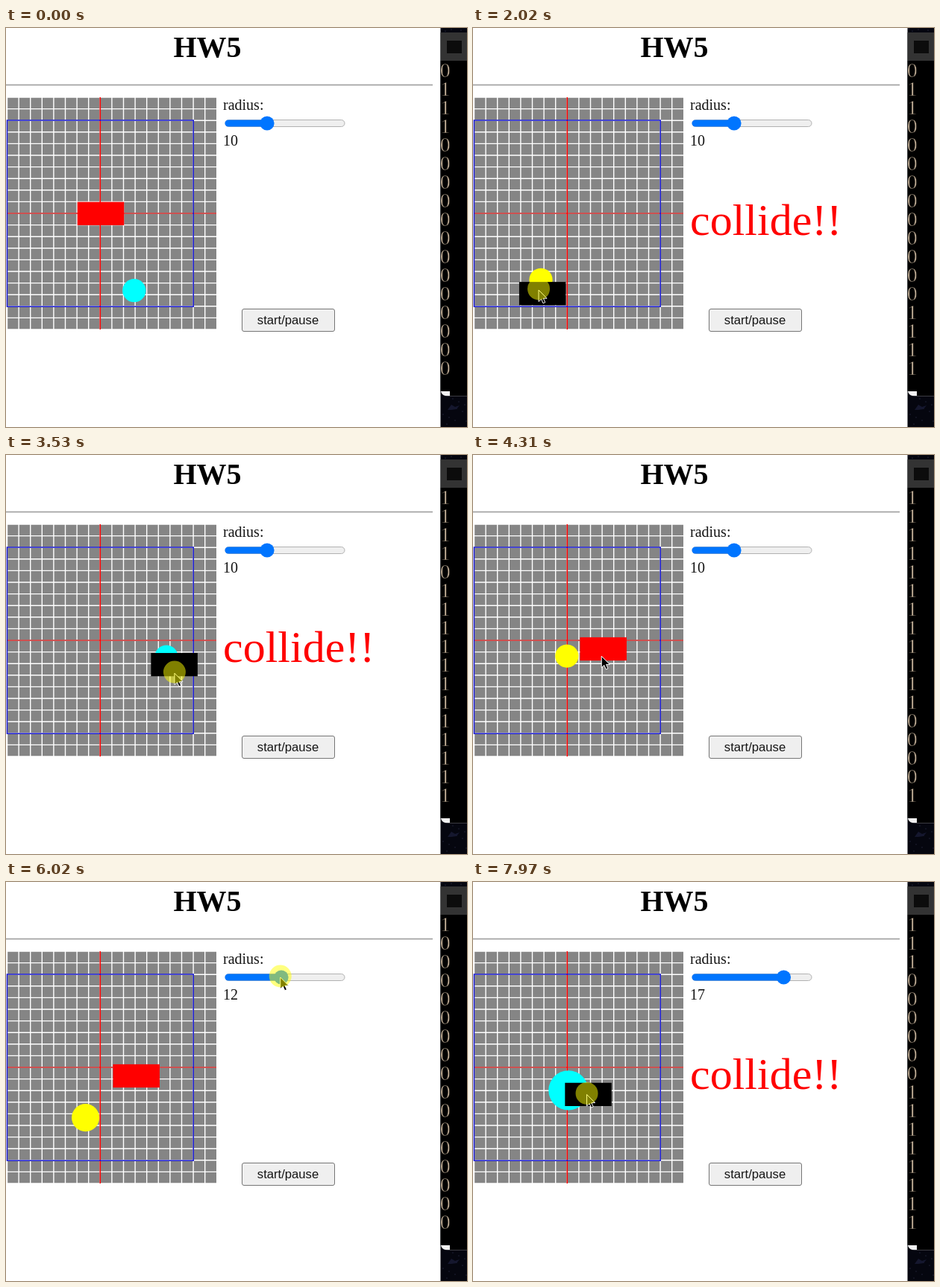
An HTML page that plays this animation: 618 by 536 pixels, repeating every 8000 ms.

```html
<!DOCTYPE html>
<html lang="en">
<head>
<meta charset="utf-8">
<title>HW5</title>
<style>
  html, body { margin: 0; width: 100%; height: 100%; overflow: hidden; background: #fff; }
  svg { display: block; width: 100%; height: 100%; }
  .serif { font-family: "Liberation Serif", "Times New Roman", serif; font-size: 20px; }
  .log { font-size: 28px; fill: #c4b199; stroke: #000; stroke-width: .6px; }
</style>
</head>
<body>
<svg viewBox="0 0 618 536">
  <rect width="618" height="536" fill="#fff"/>
  <text class="serif" x="270" y="39" text-anchor="middle" style="font-size:40px;font-weight:bold">HW5</text>
  <path d="M0 76.5H572" stroke="#999" stroke-width="1.5"/>

  <rect x="1" y="93" width="281" height="312" fill="#858585"/>
  <path id="grid" stroke="#fff" stroke-width="1.4" fill="none"/>
  <path d="M1 249H282" stroke="#c82020" stroke-width="1.4"/>
  <path d="M126.3 93V405" stroke="#f00" stroke-width="1.5"/>
  <rect x="1.5" y="124" width="249.7" height="250.2" fill="none" stroke="#1212cc" stroke-width="1.5"/>
  <circle id="ball"/>
  <rect id="block" width="62.5" height="31.25"/>

  <text class="serif" x="291" y="110" fill="#151515">radius:</text>
  <rect x="294" y="123.5" width="160" height="9" rx="4.5" fill="#efefef" stroke="#b2b2b2"/>
  <rect id="fill" x="293.5" y="123.4" height="9.2" rx="4.6" fill="#0075ff"/>
  <circle id="thumb" cy="128" r="9.6" fill="#0075ff"/>
  <text id="value" class="serif" x="291" y="158" fill="#151515"></text>
  <text id="alert" class="serif" x="291" y="278" style="font-size:60px;fill:#f00">collide!!</text>
  <rect x="316.5" y="377.5" width="124" height="30" rx="2.5" fill="#efefef" stroke="#767676"/>
  <text x="378" y="398" text-anchor="middle" fill="#151515" style="font:16.67px 'Liberation Sans',Arial,sans-serif">start/pause</text>

  <rect x="582.5" width="36" height="536" fill="#05060f"/>
  <g id="stars" fill="#3c4160"></g>
  <path d="M582.5 6H618V44H582.5Z" fill="#333"/>
  <path d="M582.5 44H618V494H591Q583 494 582.5 487Z" fill="#000"/>
  <path d="M583 487Q584 494 592 494.5H618" fill="none" stroke="#3c3c42"/>
  <rect x="591" y="17" width="20" height="17" fill="#0c0c0c"/>
  <path d="M583 488H595V494H589Q584 493 583 488Z" fill="#f2f2f2"/>
  <path d="M592 513l5-7 5 3 6-2-4 5-7 1z" fill="#15172e"/>
  <g id="log"></g>

  <path id="arrow" d="M0 0V15.5L3.6 12.2L6 17.8L8.7 16.6L6.3 11.2H11Z" fill="#000" stroke="#fff"/>
  <circle id="press" r="15" fill="#ff0" fill-opacity=".5"/>
</svg>
<script>
const LOOP = 8000, ROWS = 17, LINE_MS = 104, UNIT = 1.5625;
const BOX = { x: 1, y: 124, size: 250 }, BLOCK = { w: 62.5, h: 31.25 };

const $ = id => document.getElementById(id);
const set = (el, attrs) => { for (const k in attrs) el.setAttribute(k, attrs[k]); };
const show = (el, on) => el.setAttribute('visibility', on ? 'visible' : 'hidden');
const clamp = v => Math.min(1, Math.max(0, v));
const mix = (a, b, p) => a + (b - a) * p;
const ramp = (t, from, to) => clamp((t - from) / (to - from));
const ease = (t, from, to) => { const p = ramp(t, from, to); return p * p * (3 - 2 * p); };
const fold = v => 1 - Math.abs(v % 2 - 1);

function add(parent, tag, attrs) {
  const el = document.createElementNS('http://www.w3.org/2000/svg', tag);
  set(el, attrs);
  return parent.appendChild(el);
}

// Keys are [seconds, x, y], joined by straight lines.
function track(keys, t) {
  let i = 0;
  while (i < keys.length - 2 && t >= keys[i + 1][0]) i++;
  const [t0, x0, y0] = keys[i], [t1, x1, y1] = keys[i + 1];
  const p = ramp(t, t0, t1);
  return [mix(x0, x1, p), mix(y0, y1, p)];
}

// Distance travelled by the ball, counted in wall-to-wall crossings.
const travel = [[0, 1.29, 1.025], [1.41, 2.034, 2.482], [2.56, 2.61, 3.63], [3.53, 3.093, 4.6],
  [5.15, 3.939, 6.267], [6.85, 4.856, 8.053], [7.97, 5.49, 9.342], [8, 5.507, 9.377]];
// Where the dragged block is held relative to the ball.
const lead = [[1.66, 12, -25], [2.1, 0, 28], [2.19, 0, 48], [2.29, 8, 18],
  [2.56, 23, -2], [3.53, 10.7, 10.5], [7.97, 26.7, 5.5]];
// Mouse relative to the block while dragging, and on its own.
const grip = [[1.5, -13, -6], [2.56, 3, -3.5], [3.53, .3, 11.5], [7.97, -2, 0]];
const roam = [[.75, 490, 545], [1.1, 355, 470], [1.38, 114, 243], [4.4, 174, 271],
  [4.85, 283, 172], [5.15, 341, 138], [5.9, 350, 128], [6.35, 416, 128], [6.8, 170, 255]];

const slide = t => 10 + 7 * ramp(t, 5.9, 6.35);

function pose(t) {
  const r = slide(t) * UNIT, span = BOX.size - 2 * r;
  const [tx, ty] = track(travel, t);
  const x = BOX.x + r + span * fold(tx), y = BOX.y + r + span * fold(ty);

  const pull = ease(t, 1.5, 1.66) - ease(t, 3.72, 3.92) + ease(t, 7.03, 7.25);
  const home = t < 2.5 ? [127, 249.3] : [174.7, 260.5];
  const [lx, ly] = track(lead, t);
  const bx = mix(home[0], x + lx, pull), by = mix(home[1], y + ly, pull);

  const dx = Math.max(0, Math.abs(x - bx) - BLOCK.w / 2);
  const dy = Math.max(0, Math.abs(y - by) - BLOCK.h / 2);
  return { r, x, y, bx, by, hit: Math.hypot(dx, dy) < r };
}

// Each printed line tells whether the ball touched the block at that moment.
const lineTime = n => (n + .05) * LINE_MS;
const log = [...'0111'.padEnd(ROWS, '0')];
for (let n = 1; lineTime(n) < LOOP; n++) log.push(pose(lineTime(n) / 1000).hit ? '1' : '0');

let d = '';
for (let k = 0; k < 18; k++) d += `M${1.5 + k * 15.6} 93V405`;
for (let k = 0; k <= 20; k++) d += `M1 ${93 + k * 15.6}H282`;
set($('grid'), { d });

for (let i = 0; i < 14; i++) {
  add($('stars'), 'circle', { cx: 584 + i * 13 % 34, cy: i < 4 ? 1 + i : 497 + i * 17 % 38, r: .6 });
}

const rows = Array.from({ length: ROWS }, (_, i) =>
  add($('log'), 'text', { class: 'serif log', x: 581.7, y: 66 + 25 * i }));

function draw(ms) {
  const t = ms / 1000;
  const { r, x, y, bx, by, hit } = pose(t);
  set($('ball'), { cx: x, cy: y, r, fill: x < 126.5 ? '#ff0' : '#0ff' });
  set($('block'), { x: bx - BLOCK.w / 2, y: by - BLOCK.h / 2, fill: hit ? '#000' : '#f00' });
  show($('alert'), hit);

  const radius = Math.round(slide(t)), knob = 350 + (radius - 10) * 9.5;
  set($('thumb'), { cx: knob });
  set($('fill'), { width: knob - 293.5 });
  $('value').textContent = radius;

  const dragging = t >= 1.5 && t < 3.92 || t >= 7;
  const sliding = t >= 5.85 && t < 6.38;
  let [mx, my] = track(roam, t);
  if (dragging) {
    const [gx, gy] = track(grip, t);
    mx = bx + gx;
    my = by + gy;
  }
  set($('arrow'), { transform: `translate(${mx} ${my})` });
  set($('press'), { cx: mx, cy: my - 1.5 });
  show($('press'), dragging || sliding);

  const first = Math.max(0, Math.floor(ms / LINE_MS - .05));
  rows.forEach((row, i) => { row.textContent = log[first + i]; });
}

const start = performance.now();
function tick(now) {
  draw(Math.max(0, now - start) % LOOP);
  requestAnimationFrame(tick);
}
draw(0);
requestAnimationFrame(tick);
</script>
</body>
</html>
```
